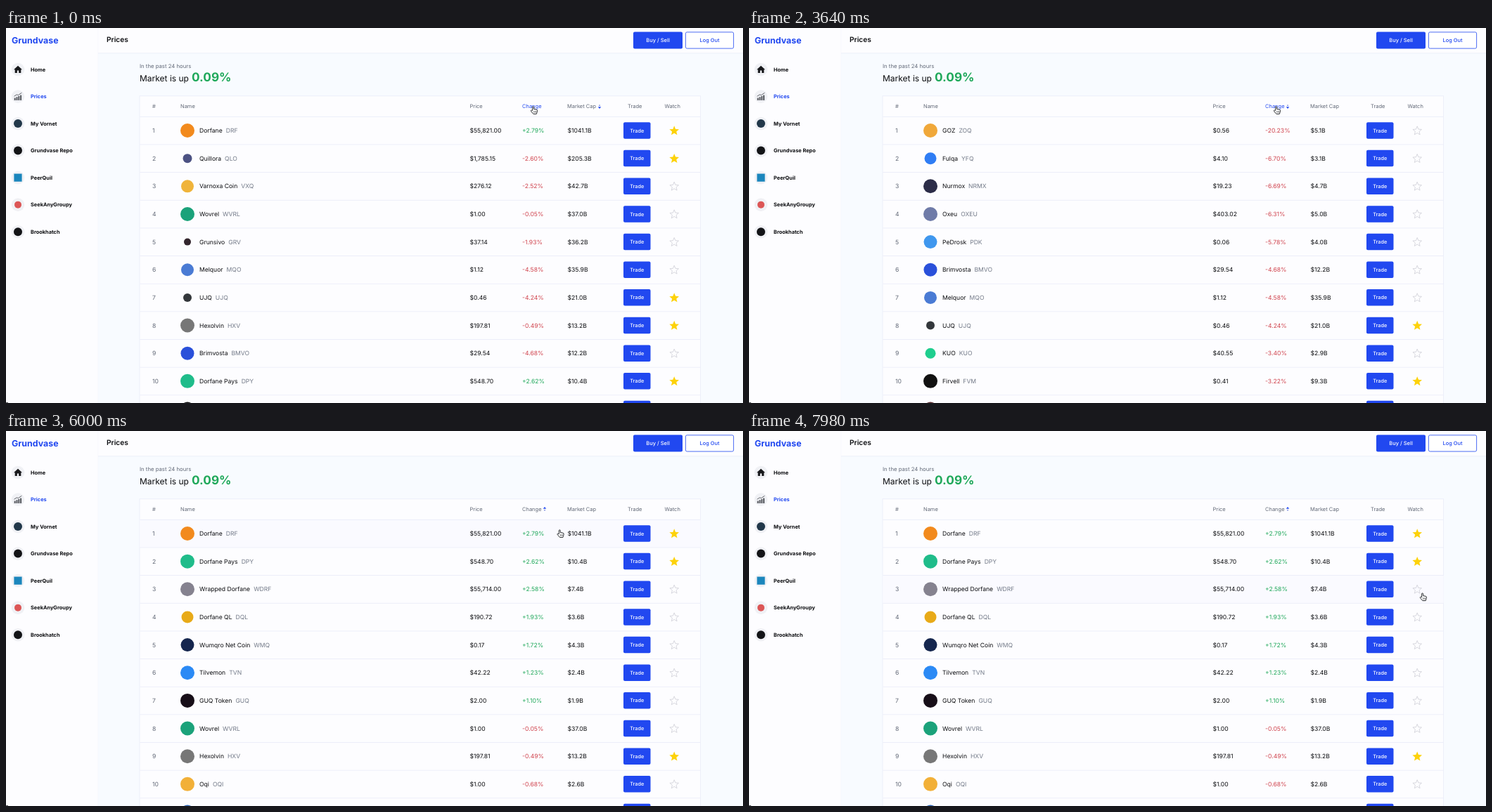
An HTML page with a canvas for the animation above (8000 ms loop, 1048 px wide and 534 px high).

```html
<!DOCTYPE html>
<html lang="en">
<head>
<meta charset="utf-8">
<title>Prices</title>
<style>
html, body { margin: 0; width: 100%; height: 100%; overflow: hidden; background: #fff; }
canvas { display: block; width: 1048px; height: 534px; }
</style>
</head>
<body>
<canvas id="stage"></canvas>
<script>
const W = 1048, H = 534, LOOP = 8000;
const BLUE = '#2148f0', INK = '#0c0d10', GREY = '#626977';
const GREEN = '#1fa85a', RED = '#d0444e', LINE = '#e9ebf8';
const ROW_TOP = 126.3, ROW_H = 39.65;

const canvas = document.getElementById('stage');
const ctx = canvas.getContext('2d');
const dpr = window.devicePixelRatio || 1;
canvas.width = W * dpr;
canvas.height = H * dpr;

// name | ticker | price | change | market cap | badge colour | badge radius | watched
const coins = {};
`Dorfane|DRF|$55,821.00|+2.79%|$1041.1B|#f28a1d|10|*
Quillora|QLO|$1,785.15|-2.60%|$205.3B|#4c5283|6.5|*
Varnoxa Coin|VXQ|$276.12|-2.52%|$42.7B|#f0b43a|9|
Wovrel|WVRL|$1.00|-0.05%|$37.0B|#1ba27a|10|
Grunsivo|GRV|$37.14|-1.93%|$36.2B|#33262d|5|
Melquor|MQO|$1.12|-4.58%|$35.9B|#4a7bd4|9|
UJQ|UJQ|$0.46|-4.24%|$21.0B|#33373b|6|*
Hexolvin|HXV|$197.81|-0.49%|$13.2B|#777777|10|*
Brimvosta|BMVO|$29.54|-4.68%|$12.2B|#2a50da|9.5|
Dorfane Pays|DPY|$548.70|+2.62%|$10.4B|#1fbc8a|10|*
GOZ|ZOQ|$0.56|-20.23%|$5.1B|#f0a83a|10|
Fulqa|YFQ|$4.10|-6.70%|$3.1B|#2f7df4|8.5|
Nurmox|NRMX|$19.23|-6.69%|$4.7B|#2c2d48|10|
Oxeu|OXEU|$403.02|-6.31%|$5.0B|#6f7ba8|10|
PeDrosk|PDK|$0.06|-5.78%|$4.0B|#3f97ee|9.5|
KUO|KUO|$40.55|-3.40%|$2.9B|#1fce8e|7.5|
Firvell|FVM|$0.41|-3.22%|$9.3B|#111111|10|*
Wrapped Dorfane|WDRF|$55,714.00|+2.58%|$7.4B|#85828f|10|
Dorfane QL|DQL|$190.72|+1.93%|$3.6B|#e8aa18|8.5|
Wumqro Net Coin|WMQ|$0.17|+1.72%|$4.3B|#15264e|9.5|
Tilvemon|TVN|$42.22|+1.23%|$2.4B|#2b8af5|10|
GUQ Token|GUQ|$2.00|+1.10%|$1.9B|#170e18|10|
Oqi|OQI|$1.00|-0.68%|$2.6B|#f2b038|10|
Ubrix|UBX||||#5a2c30|10|
Jorvo|JRV||||#2c63b4|10|`.split('\n').forEach(line => {
  const [name, ticker, price, change, cap, color, r, watched] = line.split('|');
  coins[ticker] = { name, ticker, price, change, cap, color, r: +r, watched };
});

const list = s => s.split(' ').map(t => coins[t]);
const views = [
  { from: 0, sort: 'cap', dir: 'down', rows: list('DRF QLO VXQ WVRL GRV MQO UJQ HXV BMVO DPY FVM') },
  { from: 160, sort: 'change', dir: 'down', rows: list('ZOQ YFQ NRMX OXEU PDK BMVO MQO UJQ KUO FVM UBX') },
  { from: 3660, sort: 'change', dir: 'up', rows: list('DRF DPY WDRF DQL WMQ TVN GUQ WVRL HXV OQI JRV') }
];

// pointer track: time, x, y
const track = [
  [5160, 745.5, 111.2], [5900, 780, 137.6], [6000, 783, 140.2],
  [6740, 874, 186], [6840, 884, 191], [7020, 923.5, 211.7], [7120, 923.5, 211.7],
  [7580, 952, 228.6], [7680, 952, 228.6], [7700, 953, 230], [7980, 953.4, 230.4]
];

function pointerAt(t) {
  if (t <= track[0][0]) return track[0].slice(1);
  for (let i = 1; i < track.length; i++) {
    const [t0, x0, y0] = track[i - 1], [t1, x1, y1] = track[i];
    if (t < t1) {
      const k = (t - t0) / (t1 - t0);
      return [x0 + (x1 - x0) * k, y0 + (y1 - y0) * k];
    }
  }
  return track[track.length - 1].slice(1);
}

function text(s, x, y, size, color, weight = 400, align = 'left') {
  ctx.font = `${weight} ${size}px Inter, sans-serif`;
  ctx.textAlign = align;
  ctx.fillStyle = color;
  ctx.fillText(s, x, y);
  return ctx.measureText(s).width;
}

function box(x, y, w, h, fill) {
  ctx.fillStyle = fill;
  ctx.fillRect(x, y, w, h);
}

function disc(x, y, r, fill) {
  ctx.fillStyle = fill;
  ctx.beginPath();
  ctx.arc(x, y, r, 0, Math.PI * 2);
  ctx.fill();
}

function button(x, y, w, h, label, size, outlined) {
  ctx.beginPath();
  ctx.roundRect(x, y, w, h, 2);
  ctx.fillStyle = outlined ? '#fff' : BLUE;
  ctx.fill();
  if (outlined) {
    ctx.strokeStyle = BLUE;
    ctx.lineWidth = 0.8;
    ctx.stroke();
  }
  text(label, x + w / 2, y + h / 2 + size * 0.36, size, outlined ? BLUE : '#fff', 500, 'center');
}

function poly(points, fill) {
  ctx.beginPath();
  points.forEach(([x, y]) => ctx.lineTo(x, y));
  ctx.closePath();
  if (fill) {
    ctx.fillStyle = fill;
    ctx.fill();
  }
}

function star(x, y, filled) {
  const R = filled ? 7.2 : 6.6;
  const points = Array.from({ length: 10 }, (_, i) => {
    const a = -Math.PI / 2 + i * Math.PI / 5, r = i % 2 ? R * 0.45 : R;
    return [x + r * Math.cos(a), y + 0.5 + r * Math.sin(a)];
  });
  poly(points, filled && '#fdd20a');
  if (!filled) {
    ctx.strokeStyle = '#cfcfd6';
    ctx.lineWidth = 0.8;
    ctx.stroke();
  }
}

function sortMark(x, dir) {
  const up = dir === 'up';
  const caret = (y, s, active) => {
    const w = active ? 2.2 : 1.4;
    poly([[x - w, y], [x + w, y], [x, y + s * (active ? 2.8 : 1.8)]], active ? BLUE : '#6f80d8');
  };
  caret(110.7, -1, up);
  caret(112.2, 1, !up);
}

const icons = {
  home(x, y) {
    poly([[x - 6, y + 0.3], [x, y - 5.3], [x + 6, y + 0.3], [x + 4.3, y + 0.3], [x + 4.3, y + 5],
      [x + 1.2, y + 5], [x + 1.2, y + 1.5], [x - 1.2, y + 1.5], [x - 1.2, y + 5],
      [x - 4.3, y + 5], [x - 4.3, y + 0.3]], '#17181b');
  },
  chart(x, y) {
    for (let i = 0; i < 4; i++) box(x - 5.3 + i * 2.8, y + 2 - i * 1.3, 2, 3.4 + i * 1.3, '#55585e');
    ctx.strokeStyle = '#55585e';
    ctx.lineWidth = 0.9;
    ctx.beginPath();
    ctx.moveTo(x - 5.5, y - 0.3);
    ctx.lineTo(x - 1.8, y - 2.6);
    ctx.lineTo(x + 0.6, y - 2);
    ctx.lineTo(x + 5.3, y - 5.3);
    ctx.stroke();
  },
  slate: (x, y) => disc(x, y, 6, '#22384a'),
  black: (x, y) => disc(x, y, 6, '#131417'),
  square: (x, y) => box(x - 5.6, y - 5.6, 11.2, 11.2, '#1b86bd'),
  red: (x, y) => disc(x, y, 5, '#dc5656')
};

const menu = [
  ['Home', 'home'], ['Prices', 'chart'], ['My Vornet', 'slate'], ['Grundvase Repo', 'black'],
  ['PeerQuil', 'square'], ['SeekAnyGroupy', 'red'], ['Brookhatch', 'black']
];

function drawFrame() {
  box(0, 0, W, H, '#fdfdff');
  box(131, 36, W - 131, H - 36, '#f8fbff');
  box(131, 35.5, W - 131, 0.8, LINE);
  box(130.5, 0, 0.6, H, '#f5f6fb');

  text('Grundvase', 8, 22, 12.4, BLUE, 700);
  menu.forEach(([label, icon], i) => {
    const y = 59 + i * 38.53;
    disc(17, y, 9.3, '#f0f1f5');
    icons[icon](17, y);
    text(label, 35, y + 2.7, 7.4, label === 'Prices' ? BLUE : INK, 700);
  });
  box(0, 533, 3, 1, '#55565a');

  text('Prices', 143, 20.3, 10.2, INK, 600);
  button(892, 5.5, 70, 24, 'Buy / Sell', 7.5);
  button(966.4, 5.9, 68.2, 23.2, 'Log Out', 7.4, true);

  text('In the past 24 hours', 190, 57.3, 7.75, GREY);
  text('Market is up', 190, 75.5, 12, INK);
  text('0.09%', 264, 75.5, 17.2, GREEN, 700);
}

function drawHead(view, hovered) {
  const label = (s, x, color = GREY) => text(s, x, 113.8, 7.5, color);
  label('#', 208);
  label('Name', 248);
  label('Price', 659.5);
  label('Change', 734, hovered ? BLUE : GREY);
  label('Market Cap', 798);
  label('Trade', 884);
  label('Watch', 936.5);
  sortMark(view.sort === 'cap' ? 844 : 766, view.dir);
}

function drawRow(coin, i, hovered) {
  const top = ROW_TOP + i * ROW_H, y = 146 + i * ROW_H, base = y + 3.1, size = 8.6;
  if (hovered) box(190.4, top, 797.2, ROW_H, '#fafaff');
  box(190.4, top - 0.4, 797.2, 0.8, LINE);
  text(i + 1, 208, base, size, GREY);
  disc(258, y, coin.r, coin.color);
  const w = text(coin.name, 275, base, size, INK);
  text(coin.ticker, 275 + w + 5, base, size, '#737a88');
  text(coin.price, 659.5, base, size, INK);
  text(coin.change, 734, base, size, coin.change[0] === '+' ? GREEN : RED);
  text(coin.cap, 798.5, base, size, INK);
  button(878, y - 11.8, 38.5, 23.5, 'Trade', 7.3);
  star(950.2, y, coin.watched);
}

const hand = new Path2D('M3.2 6.4V1.5a.95.95 0 0 1 1.9 0V4.2l3.7.7q1.4.3 1.2 1.8L9.5 9.2 8.8 11.2H4.4L1.1 7.3q-.6-.9.1-1.3t1.7.5z');

function drawPointer(x, y) {
  ctx.save();
  ctx.translate(x, y);
  ctx.fillStyle = '#fff';
  ctx.fill(hand);
  ctx.strokeStyle = '#202226';
  ctx.lineWidth = 0.95;
  ctx.lineJoin = 'round';
  ctx.stroke(hand);
  ctx.lineWidth = 0.6;
  ctx.beginPath();
  for (const dx of [5.2, 6.7, 8.2]) {
    ctx.moveTo(dx, 7);
    ctx.lineTo(dx, 9.4);
  }
  ctx.stroke();
  ctx.restore();
}

function draw(t) {
  ctx.setTransform(dpr, 0, 0, dpr, 0, 0);
  ctx.textRendering = 'geometricPrecision';
  const view = views.filter(v => v.from <= t).pop();
  const [px, py] = pointerAt(t);
  const hoverRow = Math.floor((py + 1 - ROW_TOP) / ROW_H);

  drawFrame();
  box(190, 97, 798, H, '#fdfdff');
  ctx.strokeStyle = LINE;
  ctx.lineWidth = 0.8;
  ctx.strokeRect(190, 96.8, 797.6, H);
  drawHead(view, py < 119);
  view.rows.forEach((coin, i) => drawRow(coin, i, i === hoverRow));
  drawPointer(px, py);
}

const start = performance.now();
function tick() {
  draw((performance.now() - start) % LOOP);
  requestAnimationFrame(tick);
}
tick();
</script>
</body>
</html>
```
